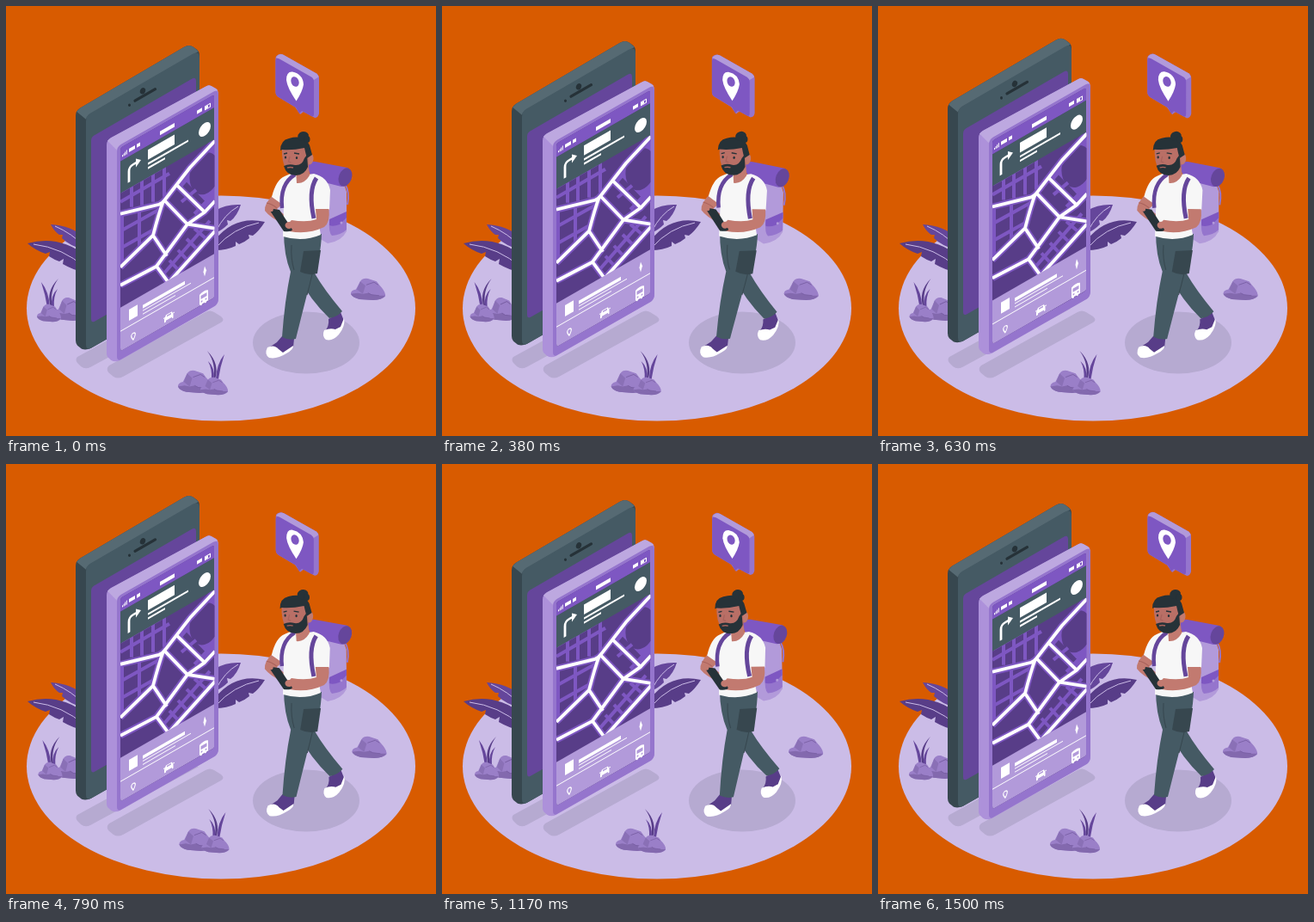
Animation of 500x500 px, one loop 1.54 s. Source, as an HTML page with a canvas:

```html
<!DOCTYPE html>
<html lang="en">
<head>
<meta charset="utf-8">
<title>Navigation walk</title>
<style>
html, body { margin: 0; width: 100%; height: 100%; overflow: hidden; background: #d85b00; }
canvas { display: block; width: 100vw; height: 100vh; }
</style>
</head>
<body>
<canvas id="stage"></canvas>
<script>
const canvas = document.getElementById('stage');
const ctx = canvas.getContext('2d');
const LOOP = 1540, FRAMES = 37, CYCLE = 1500, PHASE = 20;
const C = {
  purple: '#7e57c2', deep: '#65469b', dark: '#583d88', mid: '#9575cd', light: '#b29ada',
  pale: '#cbbce7', shade: '#b6aad1', slate: '#455a64', slateDark: '#37474f',
  ink: '#263238', skin: '#c27a70', skinDark: '#a9625c', white: '#fff', cloth: '#f7f7f7'
};

const paths = new Map();
function pathOf(d) {
  if (!paths.has(d)) paths.set(d, new Path2D(d));
  return paths.get(d);
}
function fill(d, color) {
  ctx.fillStyle = color;
  ctx.fill(pathOf(d));
}
function line(d, color, width = 1, cap = 'butt') {
  ctx.strokeStyle = color;
  ctx.lineWidth = width;
  ctx.lineCap = cap;
  ctx.lineJoin = 'round';
  ctx.stroke(pathOf(d));
}
function oval(x, y, rx, ry, color, turn = 0) {
  ctx.fillStyle = color;
  ctx.beginPath();
  ctx.ellipse(x, y, rx, ry, turn, 0, Math.PI * 2);
  ctx.fill();
}
function box(x, y, w, h, color) {
  ctx.fillStyle = color;
  ctx.fillRect(x, y, w, h);
}
function group(draw) {
  ctx.save();
  draw();
  ctx.restore();
}

// Motion
function bezierEase(p) {
  const curve = (s, a, b) => 3 * (1 - s) * (1 - s) * s * a + 3 * (1 - s) * s * s * b + s * s * s;
  let lo = 0, hi = 1;
  for (let i = 0; i < 24; i++) {
    const s = (lo + hi) / 2;
    if (curve(s, 0.36, 0.19) < p) lo = s; else hi = s;
  }
  return curve(lo, 0.07, 0.97);
}
const smooth = p => p * p * (3 - 2 * p);
const linear = p => p;
function keyed(stops, p, ease) {
  let i = 0;
  while (i < stops.length - 2 && p > stops[i + 1][0]) i++;
  const [t0, v0] = stops[i], [t1, v1] = stops[i + 1];
  return v0 + (v1 - v0) * ease((p - t0) / (t1 - t0));
}
const FLOAT = [[0, 0], [0.5, -10], [1, 0]];
const SWAY = [[0, 0], [0.25, 1], [0.75, -1], [1, 0]];
const SHAKE = [0, -1, 2, -4, 4, -4, 4, -4, 2, -1, 0].map((v, i) => [i / 10, v]);
const BEAT = [[0, 1], [0.125, 1.04], [0.264, 0.985], [0.43, 1.01], [0.65, 0.973], [0.79, 0.973], [1, 0.998]];

// Scenery
function ground() {
  oval(250, 351.5, 226, 131, C.pale);
  oval(349, 391.5, 62, 36, C.shade);
  fill('M83 408L200 344L224 352L98 420Q92 423 87 419L83 415Q80 411 83 408Z', C.shade);
  fill('M120 418L232 356Q237 353 242 356L250 361Q255 365 250 368L136 431Q130 434 125 431L119 426Q116 421 120 418Z', C.shade);
}

function leaves() {
  fill('M92 270Q76 255 52 254Q56 262 62 266L66 266L65 270Q74 279 92 284Z', C.deep);
  fill('M92 290Q62 266 25 276Q34 284 46 288L51 286L50 291Q56 295 62 297L67 294L66 300Q78 307 92 310Z', C.dark);
  line('M92 280Q76 264 57 256M92 304Q66 281 32 277', C.pale, 1);
  fill('M243 238Q256 230 273 231Q269 244 261 250L257 249L258 254Q251 261 243 264Z', C.deep);
  fill('M243 272Q266 243 301 251Q294 262 287 267L282 266L283 270Q277 275 271 277L267 274L267 279Q257 284 243 284Z', C.dark);
  line('M244 262Q254 242 270 233M244 281Q264 258 294 252', C.pale, 1);
}

function grass(x, y, flip) {
  group(() => {
    ctx.translate(x, y);
    ctx.scale(flip, 1);
    fill('M-1 0Q-2 -18 -11 -29Q-6 -14 -4 0Z', C.deep);
    fill('M0 0Q-6 -18 9 -33Q-2 -18 2 0Z', C.dark);
    fill('M1 0Q0 -14 8 -21Q3 -12 4 0Z', C.deep);
  });
}
function rock(x, y, w, h) {
  group(() => {
    ctx.translate(x, y);
    ctx.scale(w / 40, h / 26);
    fill('M0 18Q0 14 6 13L11 4Q14 0 20 1L30 4Q33 8 36 11Q41 17 40 21Q36 25 26 25L10 24Q2 22 0 18Z', '#9a7fc8');
    fill('M0 18L8 17L14 18L20 17L25 19L33 20L40 20Q36 25 26 25L10 24Q2 22 0 18Z', '#8369ae');
    fill('M11 4L17 9L14 18L7 13Z', '#8a70b6');
    line('M20 17L24 19L33 20M18 8L27 5L32 8', '#7a60a5', 0.9);
  });
}

// Phone
const STREETS = 'M133 228L190 195M133 216L180 189M146 205V234M158 198V232M171 191V228M184 184V222'
  + 'M155 236V284M135 243V304M133 262L178 237M133 282L174 259'
  + 'M190 216L206 204M204 228L221 214M219 242L233 228'
  + 'M183 312L237 250M190 296L202 309M200 284L212 297M210 271L223 284M219 259L234 272';
const ROADS = 'M133 242L178 231Q183 229 186 224L214 188L243 157M183 227Q178 240 171 267L187 291'
  + 'M133 304L171 267M133 325L175 303L189 322M184 226L211 254L243 259M211 254L175 303'
  + 'M198 208L231 240M211 254L231 240L243 227M189 322L243 262';

function mapArt() {
  fill('M133 165L242 103V340L133 402Z', C.dark);
  fill('M214 188L243 157V232L231 240L200 206Z', C.purple);
  fill('M203 213L210 205L231 227L224 235Z', C.dark);
  oval(231, 195, 17, 25, C.dark, 0.25);
  line(STREETS, C.purple, 4);
  line(ROADS, C.purple, 7.5);
  line(ROADS, C.white, 3.8);
}

function screenItems() {
  // Local axes follow the slanted face: x runs along the top edge, y runs down.
  ctx.transform(1, -0.574, 0, 1, 133, 165);
  box(0, 0, 109, 16, C.purple);
  box(0, 16, 109, 37, C.slate);
  box(0, 186, 109, 51, C.light);
  for (let i = 0; i < 4; i++) box(2 + i * 1.6, 10 - i, 1, 2 + i, C.white);
  box(10, 7, 7, 4, C.white);
  box(19, 7, 4, 4, C.white);
  box(46, 7.5, 17, 4.5, C.white);
  box(89, 8, 6, 4, C.white);
  line('M98.5 8.500H104.500V12.500H98.500Z', C.white, 1);
  box(99, 9, 3, 3, C.white);
  line('M10 46V33Q10 28 15 28H20', C.white, 2.8);
  fill('M18 23L24 28L18 33Z', C.white);
  box(32, 21, 31, 11.5, C.white);
  box(32, 36, 47, 2.3, C.white);
  box(32, 41, 20, 2.3, C.white);
  oval(98, 35, 7, 7.5, C.white);
  box(10, 194, 10, 13, C.white);
  box(26, 198, 49, 4, C.white);
  box(26, 204, 56, 1, C.white);
  box(26, 208, 38, 1, C.white);
  fill('M98 194L100 200L98 206L96.5 200Z', C.white);
  box(0, 213, 109, 1, C.white);
  line('M15 232Q12.500 228 12.700 226.500A2.300 2.300 0 1 1 17.300 226.500Q17.500 228 15 232Z', C.white, 1.2);
  fill('M51 229L53 225H60L61.500 229V233H60V231.500H53V233H51Z', C.white);
  box(54, 226, 5, 1.6, C.light);
  line('M50 227.500H52M61 227.500H63', C.white, 1);
  fill('M92 224Q97 221 102 224V236H100V238H98V236H95V238H93V236H92Z', C.white);
  box(93.5, 226, 7, 4, C.light);
  oval(94.5, 233, 1, 1, C.light);
  oval(99.5, 233, 1, 1, C.light);
}

function phone() {
  fill('M81 128Q81 122 86 119L207 48Q213 44.500 218 48L222 51Q225 53 225 58V326L99 398Q93 401 88 399L83 395Q81 393 81 389Z', C.slateDark);
  fill('M82 123L86 119L207 48Q213 44.500 218 48L224 53L99 125Q94 128 93 132Z', '#566a73');
  fill('M93 134Q93 128 98 125L217 56Q225 52 225 60V326L99 398Q93 401 93 394Z', C.slate);
  fill('M99 157Q99 153 102 151L216 85Q221 82 221 88V300L103 367Q99 369 99 364Z', C.deep);
  oval(159, 99, 3, 3.8, C.ink, 0.4);
  line('M150 110.5L173.5 97', C.ink, 3.2, 'round');
  oval(143.5, 115.5, 1.5, 1.8, C.ink);

  fill('M117 162Q117 156 122 153.500L232 94Q236 91 240 94L244 96Q247 98 247 103V340Q247 346 243 349L133 412Q127 415 122 412L120 410Q117 408 117 404Z', '#ad91da');
  fill('M118 157L122 153.500L232 94Q236 91 240 94L246 98L134 161Q130 163 129 168Z', '#bda8e0');
  fill('M129 170Q129 164 134 161L241 100Q247 97 247 104V340Q247 346 243 349L134 411Q129 414 129 407Z', C.mid);
  group(() => {
    ctx.clip(pathOf('M133 168Q133 165 136 163L239 105Q242.500 103 242.500 107V336Q242.500 339 239.500 341L136 400Q133 402 133 398Z'));
    mapArt();
    screenItems();
  });
}

function bubble() {
  fill('M313.500 61Q313.500 57.500 317 56.500Q319 55 323 57L361 78.500Q364 80.500 364 84V125Q363 130 359 130L346 123L342 126L336 117.500L317 106Q313.500 104 313.500 100Z', C.mid);
  fill('M314 59.500Q318 54.500 323 57L361 78.500Q363 80.500 363.500 82.500L358 86L317 62Z', C.light);
  fill('M313.500 63Q314 59.500 318 61.500L355 82.500Q358 84.500 358 88V126Q358 130 354 127.500L344 122L341 125L337 118L317 106Q313.500 104 313.500 100Z', C.purple);
  fill('M337.500 110.500Q327 95 326 86Q326 76 333 76.500Q345 79 346 91Q345 99 337.500 110.500Z', C.white);
  oval(336, 88, 4.5, 6, C.purple, -0.35);
}

// Walker
function backpack() {
  fill('M362 205Q386 198 393 207L396 216V262Q390 274 374 276L364 270Z', C.light);
  line('M394 207Q400 216 397 231', C.mid, 2);
  fill('M376 249L396 240V260Q390 266 379 267Q375 264 376 249Z', C.mid);
  fill('M376 248L396 239V246L388 254Q380 257 376 255Z', C.purple);
  oval(390, 252, 1.5, 1.5, C.light);
  fill('M351 186Q353 180 360 181L397 188Q403 192 402 199Q399 210 390 210L358 202Q352 196 351 186Z', C.purple);
  oval(394.5, 199, 7.5, 11, C.deep, 0.35);
}

function legs() {
  fill('M375 364L389 356L393 366Q391 376 386 381L376 386L371 378Q376 372 375 364Z', C.dark);
  fill('M370 377Q377 374 383 376L389 373L393 363Q395 372 387 382Q380 390 372 388Q367 384 370 377Z', C.white);
  fill('M338 285L362 282Q355 302 359 311Q370 330 391 355Q385 362 376 363Q353 341 341 316Z', C.slate);
  fill('M315 391L321 384L335 387L334 397Q321 407 312 405L306 397Z', C.dark);
  fill('M304 397Q312 393 317 399L322 403L334 395Q335 399 326 404Q315 411 306 409Q300 405 304 397Z', C.white);
  fill('M323 262L367 265Q366 295 356 312Q349 339 337 387Q329 389 321 385Q324 343 331 309Q323 290 323 262Z', C.slate);
  fill('M346 285L366 284L362 311Q352 314 342 309Z', C.slateDark);
  line('M332 278Q331 294 335 307M356 312Q353 325 350 336', C.slateDark, 1);
}

function torso() {
  fill('M311 219Q300 230 301 238Q307 246 322 253L328 246L315 236L324 228Z', C.skin);
  fill('M324 198Q334 192 345 197L358 195Q374 199 377 214L376 237L361 238L366 266Q345 275 322 268L323 232L309 222Q314 202 324 198Z', C.cloth);
  fill('M337 190L352 187L353 197Q347 207 338 206Z', C.skin);
  line('M336 196Q318 207 321 235', C.deep, 4.5);
  line('M361 200Q351 215 358 247', C.deep, 5);
  fill('M360 236L375.500 236Q377 252 370 257Q351 266 330 262L326 255L332 249Q350 252 361 248Z', C.skin);
  fill('M307 238Q308 236 311 236L318 237L333 260Q332 263 323 262Z', C.ink);
  oval(329, 255, 4.5, 4, C.skin);
  oval(307, 236, 4, 2.5, C.skin, 0.5);
  line('M303 229Q309 230 315 235', C.skinDark, 1);
}

function head() {
  oval(353.5, 178, 4, 6.5, C.skin, 0.15);
  fill('M321 164L351 163L352 188Q340 198 327 193Q320 182 321 164Z', '#b96f66');
  fill('M323 186Q329 183 336 185Q344 186 347 177L350 173L351 187Q347 197 337 197Q326 197 323 186Z', C.ink);
  fill('M319 168Q319 156 329 154Q347 149 353 162L356 173L350 177Q348 170 347 165Q333 168 321 167Z', C.ink);
  oval(345.5, 151.5, 6.5, 5.5, C.ink, -0.3);
  oval(350, 155, 3.5, 4, C.ink);
  line('M327 188Q331 187 334 188', C.skinDark, 1.4);
  line('M330 175L328.500 181L331.500 182', C.skinDark, 1.2);
  oval(325, 176, 1.2, 1.6, C.ink);
  oval(338, 176.5, 1.2, 1.6, C.ink);
  line('M323 172L327 171M335 171L341 172', C.ink, 1.3);
}

function draw(now) {
  const frame = Math.floor((now % LOOP) / LOOP * FRAMES);
  const p = ((frame * 1000 / 24 + PHASE) % CYCLE) / CYCLE;
  const shake = keyed(SHAKE, p, bezierEase);

  const ratio = window.devicePixelRatio || 1;
  const w = Math.round(innerWidth * ratio), h = Math.round(innerHeight * ratio);
  if (canvas.width !== w || canvas.height !== h) {
    canvas.width = w;
    canvas.height = h;
  }
  ctx.setTransform(w / 500, 0, 0, h / 500, 0, 0);
  box(0, 0, 500, 500, '#d85b00');
  ground();
  leaves();

  group(() => {
    ctx.translate(shake, 0);
    grass(52, 350, 1);
    rock(56, 338, 34, 29);
    rock(36, 346, 28, 22);
    rock(401, 316, 40, 27);
    grass(243, 434, -1);
    rock(200, 423, 39, 28);
    rock(226, 431, 32, 22);
  });
  group(() => {
    ctx.translate(0, keyed(FLOAT, p, linear));
    phone();
  });
  group(() => {
    const beat = keyed(BEAT, p, smooth);
    ctx.translate(338.5, 92.5);
    ctx.scale(beat, beat);
    ctx.translate(-338.5, -92.5);
    bubble();
  });
  group(() => {
    ctx.translate(350, 270);
    ctx.rotate(keyed(SWAY, p, smooth) * Math.PI / 180);
    ctx.translate(-350, -270);
    backpack();
    legs();
    torso();
    head();
  });
}

function tick() {
  draw(performance.now());
  requestAnimationFrame(tick);
}
tick();
</script>
</body>
</html>
```
